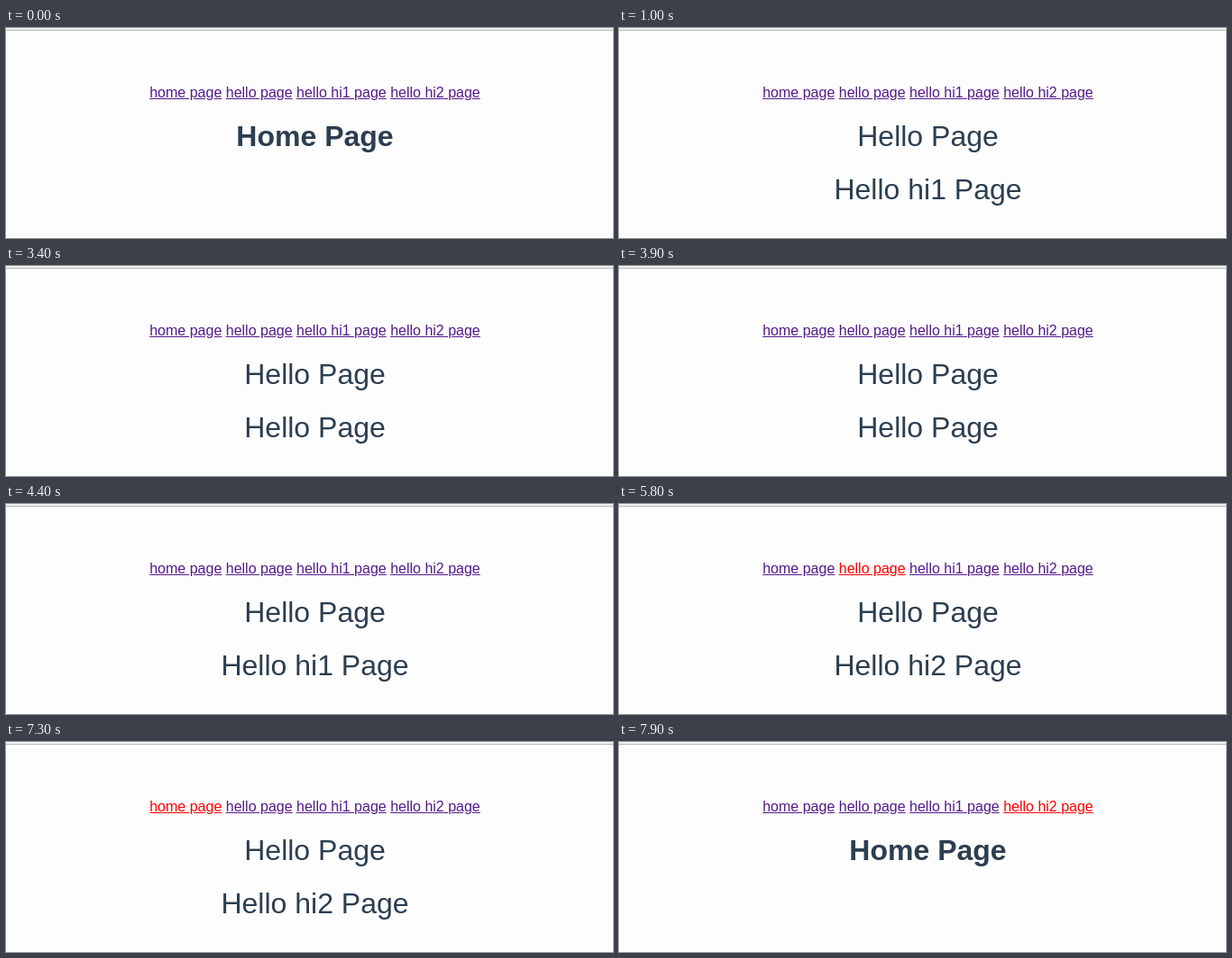
These frames come from a looping animation (673 by 233 pixels, 8000 ms). An HTML page:

```html
<!DOCTYPE html>
<html lang="en">
<head>
<meta charset="utf-8">
<title>Nested routes</title>
<style>
  html, body { margin: 0; width: 100%; height: 100%; overflow: hidden; background: #fdfdfd; }
  body { position: relative; font: 16px/17px Arial, "Liberation Sans", sans-serif; color: #2c3e50; }
  .bar { height: 2px; background: #f2f2f2; border-bottom: 1px solid #b6b6b6; }
  nav, h1 { position: absolute; left: 0; width: 685px; margin: 0; text-align: center; white-space: nowrap; }
  nav { top: 63px; }
  nav span { color: #551a8b; text-decoration: underline; }
  nav span.active { color: #f00; }
  h1 { font-size: 32px; line-height: 36px; font-weight: 400; }
  #title { top: 102px; }
  #child { top: 161px; }
  #title.home { font-weight: 700; }
</style>
</head>
<body>
<div class="bar"></div>
<nav><span>home page</span> <span>hello page</span> <span>hello hi1 page</span> <span>hello hi2 page</span></nav>
<h1 id="title"></h1>
<h1 id="child"></h1>
<script>
const LOOP = 8000;
const NONE = -1, HOME = 0, HELLO = 1, HI1 = 2, HI2 = 3;
const childTitles = ["", "Hello Page", "Hello hi1 Page", "Hello hi2 Page"];

// [start ms, page shown, link held down]
const steps = [
  [0, HOME, NONE], [500, HELLO, NONE],
  [900, HELLO, HI1], [1000, HI1, NONE],
  [1600, HI1, HI2], [1700, HI2, NONE],
  [2100, HI2, HI1], [2200, HI1, NONE],
  [2800, HI1, HELLO], [2900, HELLO, NONE],
  [3300, HELLO, HOME], [3400, HELLO, NONE], [3500, HOME, NONE],
  [3800, HOME, HELLO], [3900, HELLO, NONE],
  [4300, HELLO, HI1], [4400, HI1, NONE],
  [4900, HI1, HI2], [5000, HI2, NONE],
  [5800, HI2, HELLO], [5900, HELLO, NONE],
  [6500, HELLO, HI2], [6600, HELLO, NONE], [6700, HI2, NONE],
  [7300, HI2, HOME], [7400, HOME, NONE],
  [7900, HOME, HI2]
];

const links = document.querySelectorAll("nav span");
const title = document.getElementById("title");
const child = document.getElementById("child");
let current;

function show(step) {
  const [, page, pressed] = step;
  links.forEach((link, i) => link.classList.toggle("active", i === pressed));
  title.classList.toggle("home", page === HOME);
  title.textContent = page === HOME ? "Home Page" : "Hello Page";
  child.textContent = childTitles[page];
}

const start = performance.now();
function tick() {
  const time = (performance.now() - start) % LOOP;
  const step = steps.findLast(([from]) => from <= time);
  if (step !== current) show(current = step);
  requestAnimationFrame(tick);
}
tick();
</script>
</body>
</html>
```
